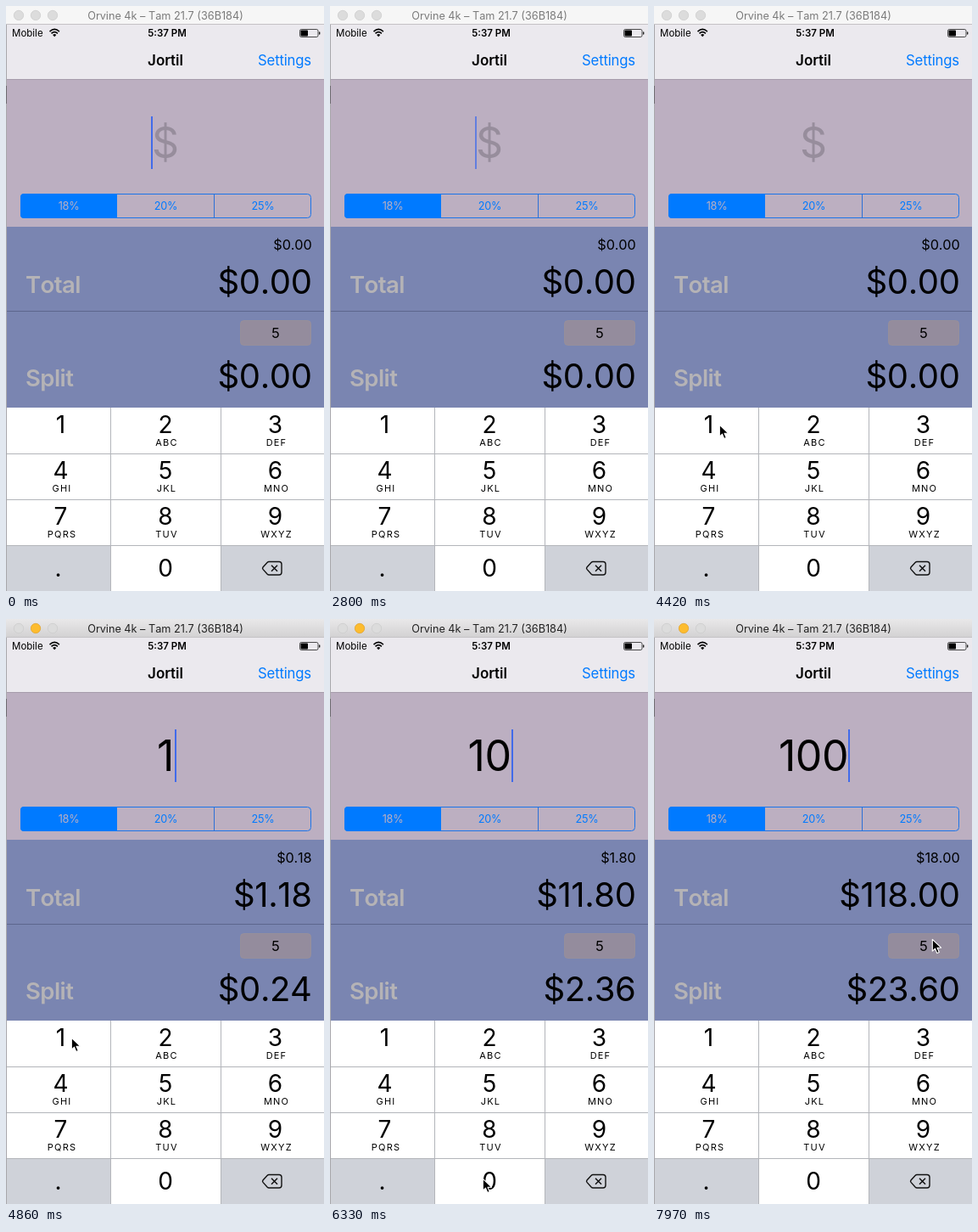
Recreate the animation shown at these times as an HTML page. Size 375x689 px, loop 8000 ms.

```html
<!DOCTYPE html>
<html lang="en">
<head>
<meta charset="utf-8">
<title>Tip calculator</title>
<style>
  html, body { margin: 0; width: 100%; height: 100%; overflow: hidden; }
  svg { display: block; width: 100%; height: 100%; overflow: hidden; }
  text { font-family: Inter, Roboto, sans-serif; font-optical-sizing: none; font-kerning: none; white-space: pre; }
</style>
</head>
<body>
<svg id="stage" viewBox="0 0 375 689">
  <defs>
    <linearGradient id="activeBar" x2="0" y2="1">
      <stop stop-color="#e9e8e9"/><stop offset="1" stop-color="#d2d1d2"/>
    </linearGradient>
  </defs>
</svg>
<script>
const LOOP = 8000;
const BLUE = '#007aff', PINK = '#bcafc1', SLATE = '#7a85b1', KEY_LINE = '#b3b5ba';
const stage = document.getElementById('stage');

function add(tag, attrs, content = '') {
  const el = document.createElementNS('http://www.w3.org/2000/svg', tag);
  for (const name in attrs) el.setAttribute(name, attrs[name]);
  el.textContent = content;
  return stage.appendChild(el);
}
const rect = (x, y, width, height, fill, more) => add('rect', { x, y, width, height, fill, ...more });
const path = (d, more) => add('path', { d, fill: 'none', ...more });
const label = (content, x, y, size, more) =>
  add('text', { x, y, 'font-size': size, 'text-anchor': 'middle', ...more }, content);
const END = { 'text-anchor': 'end' };
const START = { 'text-anchor': 'start' };

// Window title bar
const titleBar = rect(0, 0, 375, 22);
rect(0, 21, 375, 1, '#c4c2c5');
const dots = [15, 35, 55].map(cx =>
  add('circle', { cx, cy: 11, r: 5.7, fill: '#dcdcdc', stroke: '#cbcbcb', 'stroke-width': .7 }));
const title = label('Orvine 4k – Tam 21.7 (36B184)', 188, 16, 12.7);

// Status and navigation bars
rect(0, 22, 375, 64, '#ebe9ee');
label('Mobile', 7, 36.3, 11.5, START);
path('M51.5 30.2Q57.2 24.7 62.9 30.2M53.5 32.4Q57.2 28.9 60.9 32.4', { stroke: '#000', 'stroke-width': 1.6 });
path('M55.1 34Q57.2 32.2 59.3 34L57.2 36.3Z', { fill: '#000' });
label('5:37 PM', 190, 36.3, 11.5, { 'font-weight': 600 });
rect(346.5, 27.5, 21.5, 9, 'none', { rx: 1.8, stroke: '#222', 'stroke-width': .8 });
rect(347.5, 28.5, 8.5, 7, '#000', { rx: .8 });
rect(369, 30.2, 1.4, 3.6, '#222', { rx: .7 });
label('Jortil', 188, 70, 17, { 'font-weight': 600 });
label('Settings', 360, 70, 16.7, { ...END, fill: BLUE, 'letter-spacing': '-.01em' });

// Bill area
rect(0, 86, 375, 174, PINK);
rect(0, 86, 375, 1, '#a69cab');
const placeholder = label('$', 188, 179, 50, { fill: '#978d9c' });
const bill = label('', 188, 179, 50, { 'letter-spacing': '-.01em' });
const caret = rect(0, 130, 2, 62, '#416bea');

// Tip percentage control
rect(17.5, 221.5, 342, 28, 'none', { rx: 4, stroke: '#1c74e8' });
path('M131 221H21Q17 221 17 225V246Q17 250 21 250H131Z', { fill: BLUE });
rect(245, 222, 1, 28, '#2c6fd6');
[18, 20, 25].forEach((percent, i) =>
  label(percent + '%', 74 + i * 114.5, 240.3, 12.7, { fill: i ? BLUE : PINK, 'letter-spacing': '-.02em' }));

// Results
rect(0, 260, 375, 213, SLATE);
rect(0, 359, 375, 1, '#5d668d');
const heading = { ...START, fill: '#b5b3b6', 'font-weight': 600, 'letter-spacing': '-.02em' };
label('Total', 23, 338, 27.5, heading);
label('Split', 23, 447.5, 27.5, heading);
const amount = (y, size) => label('', 360.5, y, size, { ...END, 'letter-spacing': '-.01em' });
const tip = amount(286.5, 16.3), total = amount(338.6, 40), split = amount(449.6, 40);
rect(276.5, 370.5, 83, 29, '#948c9d', { rx: 4, stroke: '#9b9199', 'stroke-width': .8 });
label('5', 318, 390.5, 16.5);

// Keypad
rect(0, 473, 375, 216, '#fff');
rect(0, 635, 124, 54, '#cfd2d9');
rect(253, 635, 122, 54, '#cfd2d9');
for (const y of [527, 581, 635]) rect(0, y, 375, 1, KEY_LINE);
for (const x of [123, 253]) rect(x, 473, 1, 216, KEY_LINE);
const columns = [64.5, 188, 317.5];
['', 'ABC', 'DEF', 'GHI', 'JKL', 'MNO', 'PQRS', 'TUV', 'WXYZ'].forEach((letters, i) => {
  const x = columns[i % 3], y = 503 + Math.floor(i / 3) * 54;
  label(i + 1, x, y, 28);
  label(letters, x + 1.5, y + 15, 11, { 'letter-spacing': 1.2 });
});
label('0', 188, 672, 28);
label('.', 61.5, 671.5, 28);
path('M310 654.5H322Q325 654.5 325 657.5V667Q325 670 322 670H310Q309 670 308 669L303 663.4Q302 662.2 303 661L308 655.5Q309 654.5 310 654.5Z',
  { stroke: '#111', 'stroke-width': 1.4 });
path('M313 658.7L320 665.7M320 658.7L313 665.7', { stroke: '#111', 'stroke-width': 1.5 });

// Window's left edge
rect(0, 22, 1, 667, '#a9a8ac');
rect(0, 94, 1, 21, '#6f6d72');

const pointer = path('M1.3 1.3V15.2L4.5 12.2L6.8 17.6L9.3 16.5L7 11.2H11.6Z',
  { fill: '#000', stroke: '#fff', 'stroke-width': 1.1, 'stroke-linejoin': 'round' });

const ACTIVATED = 4720;
const KEYS = [{ at: 4850, digit: '1' }, { at: 6325, digit: '0' }, { at: 6775, digit: '0' }];
const IDLE_SINCE = -265;

// Curved pointer moves; the pointer shows from `appear` and rests at `to`.
const MOVES = [
  { appear: 150, start: 400, end: 1020, from: [250, 468], via: [220, 600], to: [143, 690] },
  { appear: 3680, start: 3700, end: 4130, from: [5, 441], via: [300, 490], to: [76, 492] },
  { appear: 4960, start: 4960, end: 5620, from: [76, 492], via: [140, 640], to: [179, 658] },
  { appear: 7300, start: 7300, end: 7960, from: [179, 658], via: [405, 376], to: [327, 376] }
];

const clamp = value => Math.min(1, Math.max(0, value));
const ease = u => u * u * (3 - 2 * u);
const money = value => '$' + value.toFixed(2);
const show = (el, visible) => el.setAttribute('visibility', visible ? 'visible' : 'hidden');

// Solid right after an edit, then a soft blink.
function caretOpacity(sinceEdit) {
  const phase = Math.max(0, sinceEdit - 400) / 960;
  return clamp(.5 + 1.3 * Math.cos(2 * Math.PI * phase));
}

function drawTitle(active) {
  titleBar.setAttribute('fill', active ? 'url(#activeBar)' : '#f6f6f6');
  title.setAttribute('fill', active ? '#222' : '#7b7b7b');
  dots[1].setAttribute('fill', active ? '#fdbc2e' : '#dcdcdc');
  dots[1].setAttribute('stroke', active ? '#e0a028' : '#cbcbcb');
}

function drawBill(time) {
  const pressed = KEYS.filter(key => key.at <= time);
  const count = pressed.length;
  const typed = pressed.map(key => key.digit).join('');
  const value = Number(typed);
  bill.textContent = typed;
  show(placeholder, !count);
  tip.textContent = money(value * .18);
  total.textContent = money(value * 1.18);
  split.textContent = money(value * 1.18 / 5);
  caret.setAttribute('x', count ? 184 + 15 * count : 171);
  caret.setAttribute('opacity', caretOpacity(time - (count ? pressed[count - 1].at : IDLE_SINCE)));
}

function drawPointer(time) {
  const move = MOVES.findLast(({ appear }) => appear <= time);
  show(pointer, move);
  if (!move) return;
  const u = ease(clamp((time - move.start) / (move.end - move.start)));
  const [x, y] = [0, 1].map(i =>
    (1 - u) ** 2 * move.from[i] + 2 * u * (1 - u) * move.via[i] + u * u * move.to[i]);
  pointer.setAttribute('transform', `translate(${x} ${y})`);
}

const start = performance.now();
function tick() {
  const time = (performance.now() - start) % LOOP;
  drawTitle(time >= ACTIVATED);
  drawBill(time);
  drawPointer(time);
  requestAnimationFrame(tick);
}
tick();
</script>
</body>
</html>
```
